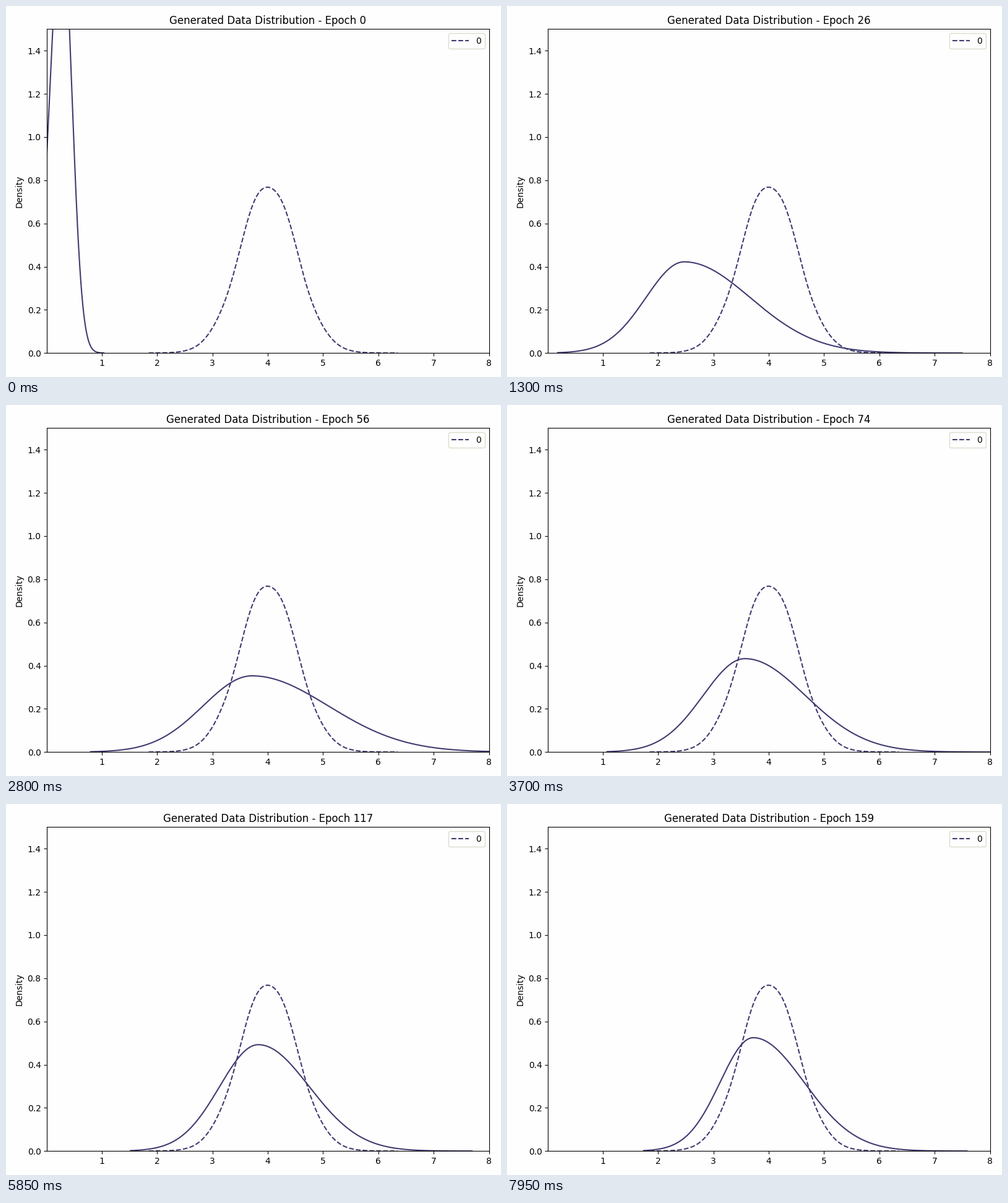
These frames come from a looping animation (800x600 px, 8 s). A matplotlib script:

```python
import numpy as np
import matplotlib.pyplot as plt
from matplotlib.animation import FuncAnimation

FRAMES, INTERVAL = 160, 50
INK, PAPER = "#3f3b70", "#fefefe"

# Training milestones: epoch, mode, spread left of it, spread right of it
STAGES = np.array([
    (0, 0.28, 0.22, 0.18),
    (16, 1.20, 0.395, 0.757),
    (37, 3.87, 1.02, 1.68),
    (74, 3.57, 0.755, 1.09),
    (98, 3.48, 0.65, 0.955),
    (117, 3.83, 0.70, 0.92),
    (159, 3.72, 0.60, 0.92),
])


def generated(epoch):
    """Two-sided bell of unit area, its shape drifting between milestones."""
    mode, left, right = (np.interp(epoch, STAGES[:, 0], col)
                         for col in STAGES[:, 1:].T)
    x = np.linspace(mode - 3.3 * left, mode + 4.2 * right, 500)
    spread = np.where(x < mode, left, right)
    height = np.sqrt(2 / np.pi) / (left + right)
    return x, height * np.exp(-((x - mode) / spread) ** 2 / 2)


def real():
    """Fixed bell with the slight ripple of a sampled estimate."""
    x = np.linspace(1.85, 6.35, 400)
    ripple = 1 + 0.02 * np.cos(2 * np.pi * (x - 3.66) / 0.75)
    return x, 0.783 * ripple * np.exp(-((x - 4.01) / 0.515) ** 2 / 2)


fig, ax = plt.subplots(figsize=(8, 6), dpi=100, facecolor=PAPER)
ax.set_facecolor(PAPER)
ax.plot(*real(), "--", color=INK, lw=1.5, label="0")
curve, = ax.plot([], [], color=INK, lw=1.5)

ax.set_xlim(0.01, 8)
ax.set_ylim(0, 1.5)
ax.set_xticks(range(1, 9))
ax.set_yticks(np.arange(0, 1.5, 0.2))
ax.set_ylabel("Density")
ax.legend(loc="upper right", facecolor=PAPER, edgecolor="#d4d4c0")
title = ax.set_title("Generated Data Distribution - Epoch 0")
fig.tight_layout()


def update(epoch):
    curve.set_data(*generated(epoch))
    title.set_text(f"Generated Data Distribution - Epoch {epoch}")
    return curve, title


anim = FuncAnimation(fig, update, frames=FRAMES, interval=INTERVAL,
                     repeat=True, repeat_delay=0, blit=False)
plt.show()
```
